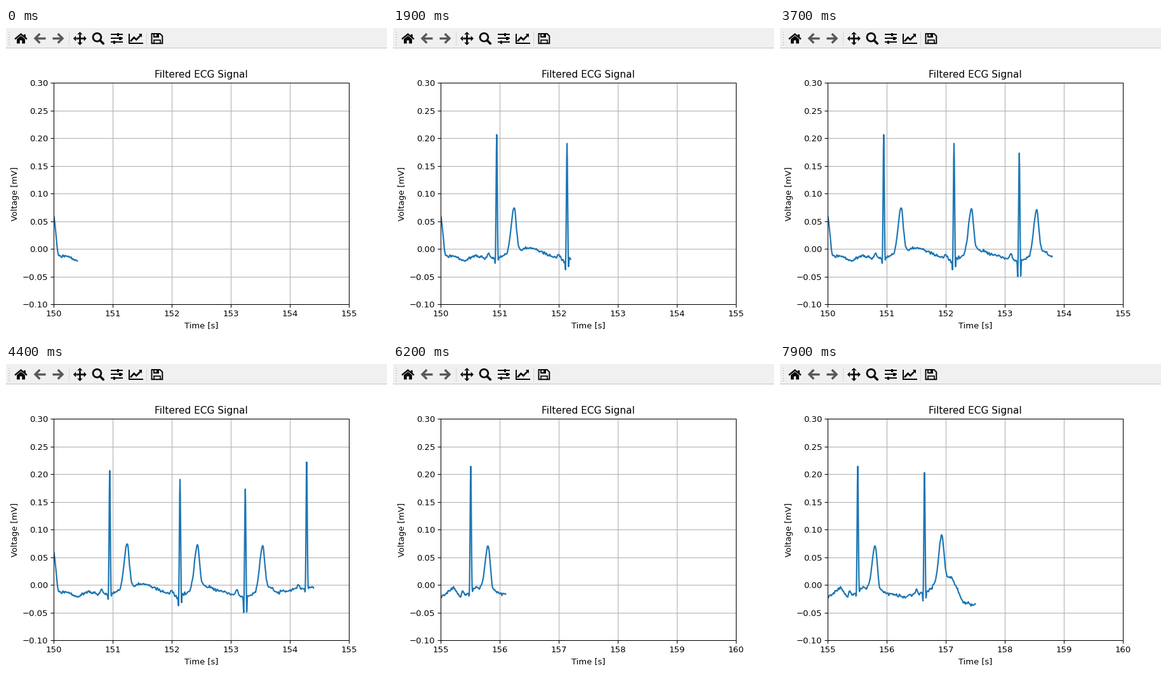
Recreate the animation shown at these times as a matplotlib script. Size 600x484 px, loop 8 s.

```python
import matplotlib.pyplot as plt
import numpy as np
from matplotlib.animation import FuncAnimation
from matplotlib.patches import Circle, Polygon, Rectangle

W, H, DPI = 600, 484, 93.75
BAR_H = 31
PX = 72 / DPI  # points per pixel
INK, GREY, BAR = "#0a0a0a", "#585858", "#f0f0f0"

FRAMES, INTERVAL = 80, 100
START, SPAN = 150, 5
RATE = 200  # samples per second
STALLS = (6, 21, 32, 43, 54, 64, 69, 79)  # steps where no new data arrives

# Heartbeats: (seconds after START, peak in mV)
BEATS = [(-.295, .2), (.95, .206), (2.14, .195), (3.245, .179),
         (4.285, .211), (5.51, .211), (6.64, .199)]

# Turning points of the slow baseline drift
DRIFT = [(0, -.019), (.2, -.011), (.4, -.021), (.58, -.011), (.75, -.018),
         (1, -.014), (1.5, .003), (2.1, -.022), (2.55, -.002), (3.23, -.023),
         (3.65, -.004), (3.8, -.013), (4.4, -.003), (5, -.023), (5.22, -.004),
         (5.33, -.024), (5.6, -.005), (6.3, -.021), (6.65, -.014),
         (6.93, .011), (7.1, .014), (7.3, -.032), (7.5, -.037)]


def bump(d, width):
    return np.exp(-(d / width) ** 2)


def heartbeat(d, peak):
    """One beat at offset d from its peak; weaker peaks dip deeper."""
    weak = .211 - peak
    p = .009 * bump(d + .14, .03)
    q = -(.013 + .6 * weak) * bump(d + .025, .007)
    r = (peak + .016) * bump(d, .0135)
    s = -(.007 + .85 * weak) * bump(d - .025, .007)
    t = .08 * bump(d - .293, np.where(d < .293, .07, .052))
    return p + q + r + s + t


def ecg(t):
    y = np.interp(t, *zip(*DRIFT))
    for at, peak in BEATS:
        y += heartbeat(t - at, peak)
    rng = np.random.default_rng(5)
    grid = np.arange(0, t[-1] + .02, .012)
    return y + np.interp(t, grid, rng.normal(0, .0015, grid.size))


def stroke(ax, pts, width, color=INK, cap="butt"):
    ax.plot(*zip(*pts), color=color, lw=width * PX, solid_capstyle=cap,
            solid_joinstyle="miter")


def fill(ax, pts, color=INK):
    ax.add_patch(Polygon(pts, closed=True, fc=color, ec="none"))


def box(ax, x, y, w, h, color=INK):
    ax.add_patch(Rectangle((x, y), w, h, fc=color, ec="none"))


def draw_toolbar(ax):
    box(ax, 0, 0, W, BAR_H, BAR)
    box(ax, 0, BAR_H, W, 1, "#c4c4c4")
    for y in range(6, 28, 4):
        box(ax, 4, y, 1.5, 1.5, "#bdbdbd")
    for x in (99, 221):
        box(ax, x, 5, 1, 23, "#d8d8d8")

    # home
    stroke(ax, [(14, 17.5), (23.5, 9.6), (33, 17.5)], 2.4)
    box(ax, 28, 9.6, 2.6, 5)
    fill(ax, [(17, 17.5), (23.5, 12.2), (30, 17.5), (30, 24.4), (25.2, 24.4),
              (25.2, 19.4), (21.8, 19.4), (21.8, 24.4), (17, 24.4)])

    # back and forward
    for tip, way in ((46, 1), (89, -1)):
        elbow = tip + way * 7.3
        stroke(ax, [(elbow, 9), (tip, 16.3), (elbow, 23.6)], 3.4, GREY)
        stroke(ax, [(tip, 16.3), (tip + way * 16, 16.3)], 3.4, GREY)

    # pan
    cx, cy = 116.4, 16.5
    for dx, dy in ((1, 0), (-1, 0), (0, 1), (0, -1)):
        bx, by = cx + 6.3 * dx, cy + 6.3 * dy
        stroke(ax, [(cx, cy), (bx, by)], 2.8)
        fill(ax, [(cx + 10.5 * dx, cy + 10.5 * dy),
                  (bx + 4.2 * dy, by + 4.2 * dx),
                  (bx - 4.2 * dy, by - 4.2 * dx)])

    # zoom
    ax.add_patch(Circle((143.4, 14.6), 6.4, fc="none", ec=INK, lw=2.8 * PX))
    stroke(ax, [(148.1, 19.3), (153.3, 24.5)], 3.6, cap="round")

    # sliders
    for y, knob in ((10.5, 176.5), (16.5, 180), (22.5, 170.5)):
        stroke(ax, [(165, y), (184, y)], 2)
        box(ax, knob - 2.4, y - 2.6, 4.8, 5.2, BAR)
        box(ax, knob - 1.6, y - 2.6, 3.2, 5.2)

    # line chart
    stroke(ax, [(193.6, 8.6), (193.6, 24), (215.5, 24)], 2)
    stroke(ax, [(196, 21), (201.5, 14.9), (205.3, 18.3), (212.2, 11.3)], 2.7)
    fill(ax, [(208.5, 9.2), (214.3, 9.2), (214.3, 15)])

    # save
    stroke(ax, [(236, 9), (242.6, 9), (246.3, 12.6), (246.3, 24.2),
                (229.5, 24.2), (229.5, 9), (236, 9)], 2)
    box(ax, 232.2, 8.6, 9.2, 6)
    box(ax, 234, 9.7, 3, 3.5, BAR)
    stroke(ax, [(233, 23.6), (233, 18.6), (242.8, 18.6), (242.8, 23.6)], 1.7)


fig = plt.figure(figsize=(W / DPI, (H + 1e-4) / DPI), dpi=DPI, facecolor="white")

screen = fig.add_axes([0, 0, 1, 1])
screen.set(xlim=(0, W), ylim=(H, 0))
screen.axis("off")
draw_toolbar(screen)

ax = fig.add_axes([75 / W, 49.7 / H, 465 / W, 348 / H])
ax.set(ylim=(-.1, .3), xlabel="Time [s]", ylabel="Voltage [mV]")
ax.set_title("Filtered ECG Signal", fontsize=11.85, pad=6.3)
ax.tick_params(labelsize=10.15, pad=3)
ax.grid(True)
trace, = ax.plot([], [], color="#1f77b4", lw=1.7)

time = np.arange(7.5 * RATE + 1) / RATE
volts = ecg(time)


def update(i):
    tenths = 4 + i - sum(s <= i for s in STALLS)
    page = tenths // (10 * SPAN)
    left = START + page * SPAN
    first, last = page * SPAN * RATE, tenths * RATE // 10
    shown = slice(first, last + 1 if last > first else first)
    trace.set_data(START + time[shown], volts[shown])
    ax.set_xlim(left, left + SPAN)
    ax.set_xticks(range(left, left + SPAN + 1))
    return trace,


anim = FuncAnimation(fig, update, frames=FRAMES, interval=INTERVAL,
                     repeat=True, repeat_delay=0, blit=False)
plt.show()
```
